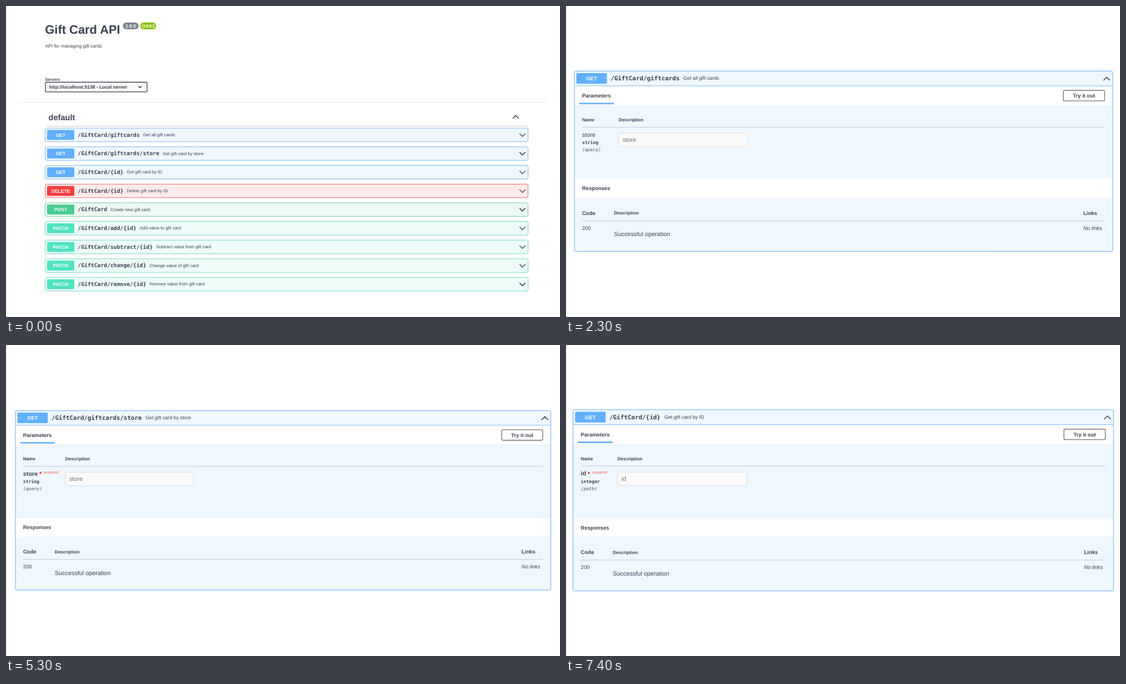
These frames come from a looping animation (998 px wide and 561 px high, 8 s). An HTML page:

```html
<!DOCTYPE html>
<html lang="en">
<head>
<meta charset="utf-8">
<title>Gift Card API</title>
<style>
  html, body { margin: 0; width: 100%; height: 100%; overflow: hidden; background: #fff; }
  svg { display: block; width: 100vw; height: 100vh; }
  text { font-family: "Liberation Sans", Arial, sans-serif; fill: #3b4151; white-space: pre; text-rendering: geometricPrecision; }
  .b { font-weight: 700; }
  .i { font-style: italic; }
  .m { font-family: "DejaVu Sans Mono", monospace; font-weight: 700; }
  .mid { text-anchor: middle; }
  .glow { filter: drop-shadow(0 0 .9px rgba(0, 0, 0, .19)); }
  .drop { filter: drop-shadow(0 .7px .7px rgba(0, 0, 0, .14)); }
</style>
</head>
<body>
<svg id="stage" viewBox="0 0 998 561"></svg>
<script>
const NS = 'http://www.w3.org/2000/svg';
const stage = document.getElementById('stage');
const LOOP = 8000;
const MONO = 0.602; // advance of the monospaced face, in em
const COLORS = {
  GET: ['#61affe', '#eff7ff'],
  DELETE: ['#f93e3e', '#feebeb'],
  POST: ['#49cc90', '#edf9f3'],
  PATCH: ['#50e3c2', '#edfcf9']
};

function add(parent, tag, attrs, content) {
  const el = document.createElementNS(NS, tag);
  for (const k in attrs) el.setAttribute(k, attrs[k]);
  if (content) el.textContent = content;
  return parent.appendChild(el);
}

const text = (g, x, y, size, str, cls = '', fill) =>
  add(g, 'text', { x, y, 'font-size': size, class: cls, ...(fill && { style: `fill:${fill}` }) }, str);

const rect = (g, x, y, width, height, fill, more = {}) =>
  add(g, 'rect', { x, y, width, height, fill, ...more });

const line = (g, x1, x2, y, stroke, width = 0.7) =>
  add(g, 'path', { d: `M${x1} ${y}H${x2}`, stroke, 'stroke-width': width });

// dy > 0 points down, dy < 0 points up
const chevron = (g, x, y, dx, dy, width = 1.2) =>
  add(g, 'path', {
    d: `M${x - dx} ${y - dy}L${x} ${y + dy}L${x + dx} ${y - dy}`,
    fill: 'none', stroke: '#22252c', 'stroke-width': width,
    'stroke-linecap': 'round', 'stroke-linejoin': 'round'
  });

function badge(g, x, w, fill, str) {
  rect(g, x, 29.8, w, 12.2, fill, { rx: 6.1 });
  text(g, x + w / 2, 38.9, 8.4, str, 'b mid', '#fff');
}

function listRow(g, y, method, path, summary) {
  const [main, tint] = COLORS[method];
  rect(g, 70.8, y, 869.4, 24.2, tint, { rx: 2.4, stroke: main, 'stroke-width': 0.7, class: 'glow' });
  rect(g, 74, y + 3.2, 49, 17.8, main, { rx: 1.8 });
  text(g, 98.5, y + 15.1, 8.53, method, 'b mid', '#fff');
  text(g, 129.3, y + 15.2, 9.75, path, 'm');
  text(g, 129.3 + path.length * 9.75 * MONO + 6.1, y + 14.6, 7.95, summary);
  chevron(g, 930.4, y + 12.4, 5, 2.5);
}

function drawList(g) {
  text(g, 70.3, 50, 21.9, 'Gift Card API', 'b');
  badge(g, 210.5, 28.3, '#7d8492', '1.0.0');
  badge(g, 242, 28.3, '#89bf04', 'OAS3');
  text(g, 70.4, 75.2, 8.53, 'API for managing gift cards');

  text(g, 70.4, 134.6, 7.3, 'Servers', 'b');
  rect(g, 71, 137.5, 183.2, 17.4, '#f7f7f7', { rx: 2, stroke: '#41444e', 'stroke-width': 1.3, class: 'drop' });
  text(g, 77.8, 149.2, 8.53, 'http://localhost:5138 - Local server', 'b');
  chevron(g, 241.2, 146.2, 2.6, 1.3, 1.1);

  line(g, 24, 974.5, 174.3, '#dfe0e3');
  text(g, 76.5, 206.1, 14.6, 'default', 'b');
  chevron(g, 918.3, 200, 5, -2.5);
  line(g, 70.5, 940.5, 216.8, '#bdc0c5', 0.8);

  [
    ['GET', '/GiftCard/giftcards', 'Get all gift cards'],
    ['GET', '/GiftCard/giftcards/store', 'Get gift card by store'],
    ['GET', '/GiftCard/{id}', 'Get gift card by ID'],
    ['DELETE', '/GiftCard/{id}', 'Delete gift card by ID'],
    ['POST', '/GiftCard', 'Create new gift card'],
    ['PATCH', '/GiftCard/add/{id}', 'Add value to gift card'],
    ['PATCH', '/GiftCard/subtract/{id}', 'Subtract value from gift card'],
    ['PATCH', '/GiftCard/change/{id}', 'Change value of gift card'],
    ['PATCH', '/GiftCard/remove/{id}', 'Remove value from gift card']
  ].forEach((row, i) => listRow(g, 220.4 + i * 33.68, ...row));
}

// One expanded operation; cx and k place and scale the panel.
function drawDetail(root, { cx, k, path, summary, name, type, place, col, star }) {
  const g = add(root, 'g', { transform: `translate(${cx} 280.2) scale(${k}) translate(-500 -280.2)` });
  const [blue, tint] = COLORS.GET;
  const rule = '#b4bac4';

  rect(g, 15.2, 117.5, 969.6, 325.3, tint, { rx: 2.7, class: 'glow' });
  rect(g, 15.2, 144.2, 969.6, 34.8, '#fff', { class: 'drop' });
  rect(g, 15.2, 312, 969.6, 34.4, '#fff', { class: 'drop' });
  line(g, 15.2, 984.8, 144, blue, 0.8);
  rect(g, 15.2, 117.5, 969.6, 325.3, 'none', { rx: 2.7, stroke: blue, 'stroke-width': 0.9 });

  rect(g, 18.8, 121.1, 54.8, 19.2, blue, { rx: 2 });
  text(g, 46.2, 134.1, 9.5, 'GET', 'b mid', '#fff');
  text(g, 80.4, 134.2, 10.86, path, 'm');
  text(g, 80.4 + path.length * 10.86 * MONO + 7, 133.4, 8.85, summary);
  chevron(g, 974, 131.2, 5.5, -2.7, 1.3);

  text(g, 29, 165, 9.5, 'Parameters', 'b');
  rect(g, 23.8, 174.6, 62.4, 2.7, blue);
  rect(g, 896, 152.2, 74.2, 18.9, '#fff', { rx: 2.4, stroke: '#777', 'stroke-width': 1.4, class: 'drop' });
  text(g, 933.1, 165, 9.5, 'Try it out', 'b mid');

  text(g, 29, 208.1, 8.15, 'Name', 'b');
  text(g, col, 208.1, 8.15, 'Description', 'b');
  line(g, 29, 970.5, 218.6, rule, 0.8);
  text(g, 29, 235.5, 10.86, name, star ? 'b' : '');
  if (star) {
    text(g, star, 236.2, 10.86, '*', 'b', '#f00');
    text(g, star + 8, 231.8, 7.45, 'required', '', '#ff6262');
  }
  text(g, 29, 249.2, 8.15, type, 'm');
  text(g, 29, 262.2, 8.15, place, 'm i', '#808080');
  rect(g, col + 0.2, 229.5, 232, 24.2, '#fafafa', { rx: 2.4, stroke: '#d6d8db', 'stroke-width': 0.8 });
  text(g, col + 7.2, 245.2, 10.86, name, '', '#6c6c6c');

  text(g, 29, 332.3, 9.5, 'Responses', 'b');
  text(g, 29, 377, 9.5, 'Code', 'b');
  text(g, 86.4, 376.4, 8.15, 'Description', 'b');
  text(g, 932, 377, 9.5, 'Links', 'b');
  line(g, 29, 970.5, 387.5, rule, 0.8);
  text(g, 29, 403.5, 9.5, '200');
  text(g, 86.4, 415.3, 10.9, 'Successful operation');
  text(g, 932, 403.5, 9.5, 'No links', 'i');
}

const scenes = [
  { from: 0, to: 500, draw: drawList },
  { from: 500, to: 3500, cx: 500, k: 1, path: '/GiftCard/giftcards', summary: 'Get all gift cards',
    name: 'store', type: 'string', place: '(query)', col: 94.8 },
  { from: 3500, to: 6500, cx: 499.2, k: 0.9945, path: '/GiftCard/giftcards/store', summary: 'Get gift card by store',
    name: 'store', type: 'string', place: '(query)', col: 105.4, star: 58.3 },
  { from: 6500, to: LOOP, cx: 499.5, k: 1.004, path: '/GiftCard/{id}', summary: 'Get gift card by ID',
    name: 'id', type: 'integer', place: '(path)', col: 94.8, star: 41.4 }
];

for (const s of scenes) {
  const g = add(stage, 'g', {});
  (s.draw || drawDetail)(g, s);
  g.animate([
    { offset: 0, opacity: s.from ? 0 : 1 },
    { offset: s.from / LOOP, opacity: 1 },
    { offset: s.to / LOOP, opacity: 0 },
    { offset: 1, opacity: 0 }
  ].map(f => ({ ...f, easing: 'step-end' })), { duration: LOOP, iterations: Infinity });
}
</script>
</body>
</html>
```
